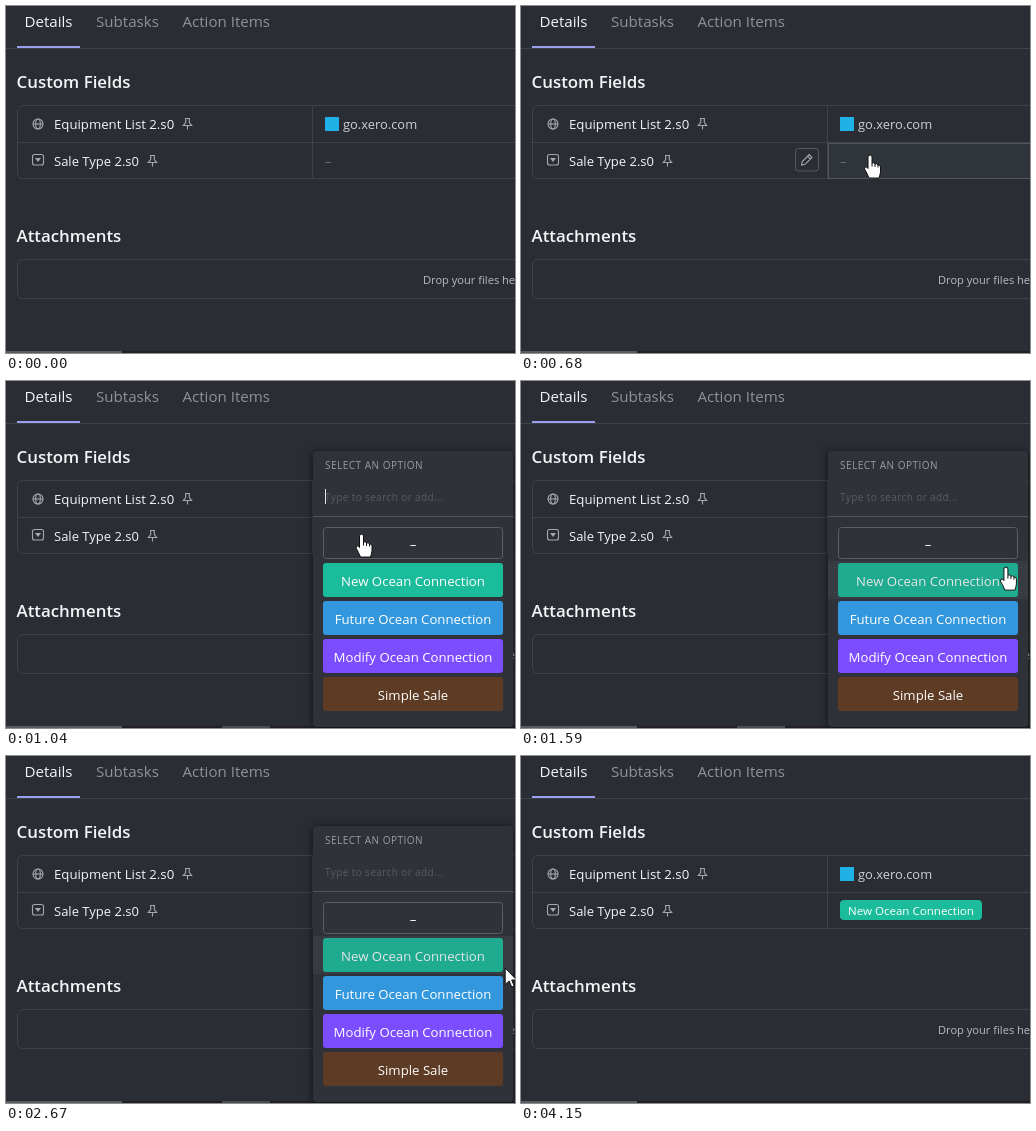
Write an HTML page that moves like this. It is 509 px wide and 347 px high and loops after 4.22 s.

```html
<!DOCTYPE html>
<html lang="en">
<head>
<meta charset="utf-8">
<title>Custom fields</title>
<style>
  html, body { margin: 0; width: 100%; height: 100%; overflow: hidden; background: #2a2d34; }
  svg { display: block; font: 13.2px "Open Sans", "Noto Sans", sans-serif; }
  .line { fill: none; stroke: #3e4249; }
  .icon { fill: none; stroke: #a4a8b0; stroke-width: 1.1; }
  .dim { fill: #8e939c; }
  .tab { font-size: 15.1px; }
  .head { font-size: 16.9px; font-weight: 600; }
  .mid { text-anchor: middle; }
  #panel { filter: drop-shadow(0 1px 4px #0009); }
  #cursor path { fill: #fff; stroke: #111; stroke-linejoin: round; }
</style>
</head>
<body>
<svg width="509" height="347" viewBox="0 0 509 347" fill="#f4f5f7">
  <defs>
    <path id="pin" class="icon" d="M2.5 .5H7.5M3.2 .5V4.5L.8 7.5H9.2L6.8 4.5V.5M5 7.5V11.5"/>
  </defs>

  <path class="line" d="M0 42.5H509"/>
  <path fill="#9b9ff0" d="M11 40H74V42H11Z"/>
  <g class="tab">
    <text x="18.5" y="21">Details</text>
    <text x="90" y="21" class="dim">Subtasks</text>
    <text x="176.5" y="21" class="dim">Action Items</text>
  </g>

  <text x="10.5" y="82" class="head">Custom Fields</text>
  <path class="line" d="M509 99.5H17.5Q11.5 99.5 11.5 105.5V166.5Q11.5 172.5 17.5 172.5H509M11.5 136.5H509M306.5 99.5V172.5"/>
  <g class="icon">
    <circle cx="32" cy="118" r="5"/>
    <ellipse cx="32" cy="118" rx="2.3" ry="5"/>
    <path d="M27 118H37"/>
    <rect x="26.5" y="148.5" width="11" height="10.5" rx="2"/>
  </g>
  <path fill="#a4a8b0" d="M29 152H35L32 156Z"/>
  <text x="48" y="123">Equipment List 2.s0</text>
  <text x="48" y="160" font-size="13">Sale Type 2.s0</text>
  <use href="#pin" x="176.5" y="112"/>
  <use href="#pin" x="141.5" y="149"/>
  <rect x="319" y="111" width="14" height="14" fill="#1fb1e6"/>
  <text x="337" y="123" font-size="12.9" fill="#cdd1d6">go.xero.com</text>

  <g id="hover">
    <rect x="307.5" y="137.5" width="210" height="35" fill="#30353b" stroke="#50555c"/>
    <rect x="274.5" y="142.5" width="23" height="22.5" rx="3" fill="none" stroke="#555960"/>
    <path class="icon" d="M280.5 159L281.3 155.5L288.2 148.6L291 151.4L284 158.3ZM286.6 150.2L289.4 153"/>
  </g>
  <text id="none" x="319" y="160" fill="#6b7078">–</text>
  <g id="badge">
    <rect x="319" y="144" width="142" height="20" rx="4" fill="#1bbc9c"/>
    <text x="390" y="158.5" class="mid" font-size="11.55" fill="#fff">New Ocean Connection</text>
  </g>

  <text x="10.5" y="236" class="head">Attachments</text>
  <path class="line" d="M509 253.5H17.5Q11.5 253.5 11.5 259.5V286.5Q11.5 292.5 17.5 292.5H509"/>
  <text x="417" y="278" font-size="11.1" fill="#b8bcc2">Drop your files here</text>

  <path fill="#211f24" d="M0 345H509V347H0Z"/>
  <path fill="#585b60" d="M0 345H116V347H0Z"/>
  <path id="strip" fill="#4b4b50" d="M216 345H264V347H216Z"/>

  <g id="panel">
    <rect x="307" y="70" width="200" height="276" rx="4" fill="#2f3339"/>
    <text x="319" y="88" font-size="10" letter-spacing=".5" fill="#989ca4">SELECT AN OPTION</text>
    <text x="319" y="120" font-size="10" letter-spacing=".4" fill="#575b62">Type to search or add...</text>
    <path id="caret" stroke="#e4e6e8" d="M319.5 108V123"/>
    <path stroke="#50545a" d="M307 135.5H507"/>
    <rect id="band" x="307" y="180" width="200" height="38" fill="#383c42"/>
    <rect x="317.5" y="146.5" width="179" height="31" rx="3" fill="none" stroke="#5a5e65"/>
    <text x="407" y="168" class="mid">–</text>
    <g id="options"></g>
  </g>

  <g id="cursor">
    <path id="arrow" d="M0 0V16.5L4 13L6.5 19L9 18L6.5 12H11.5Z"/>
    <g id="hand">
      <path d="M-2 2Q-2 0 0 0T2 2V8Q4 7 5 9Q7 8 8 10Q10.5 9.5 10.5 12V17Q10 20 9 23H-1Q-3 18 -5.5 14Q-5.5 11 -3 12L-2 13.5Z"/>
      <path style="fill:none" d="M2 8V11.5M5 9V12M8 10V12.5"/>
    </g>
  </g>
</svg>
<script>
const LOOP = 4220, OPEN = 890, CLOSE = 2740;
const $ = id => document.getElementById(id);
const show = (id, on) => $(id).style.display = on ? "" : "none";

$("options").innerHTML = [
  ["New Ocean Connection", "#1bbc9c"],
  ["Future Ocean Connection", "#3397dd"],
  ["Modify Ocean Connection", "#7c4dff"],
  ["Simple Sale", "#5d3b24"]
].map(([label, color], i) => `<g>
  <rect x="317" y="${182 + i * 38}" width="180" height="34" rx="3" fill="${color}"/>
  <text x="407" y="${204.5 + i * 38}" class="mid" fill="#fff">${label}</text></g>`).join("");
const first = $("options").firstElementChild;

// Pointer path: time, x, y of the tip. It rises from below, slowing down.
const path = [
  [260, 259, 292], [400, 312, 207], [540, 340, 164], [680, 349, 149],
  [890, 355, 153], [1040, 355, 153], [1320, 497, 168], [1450, 497, 168],
  [1800, 467, 213], [2400, 467, 213], [2670, 499, 212], [2740, 512, 212]
];

function pointer(t) {
  const i = path.findIndex(p => p[0] > t);
  if (i < 1) return null;
  const [a, b] = [path[i - 1], path[i]];
  const k = (t - a[0]) / (b[0] - a[0]);
  return { x: a[1] + (b[1] - a[1]) * k, y: a[2] + (b[2] - a[2]) * k };
}

function draw(t) {
  const p = pointer(t);
  const open = t >= OPEN && t < CLOSE;
  const done = t >= CLOSE;

  show("cursor", p);
  if (p) {
    const hand = open ? p.x < 497 : p.x > 307 && p.y < 172;
    $("cursor").setAttribute("transform", `translate(${p.x} ${p.y})`);
    show("hand", hand);
    show("arrow", !hand);
  }

  show("hover", p && !open && p.y < 172);
  show("none", !done);
  show("badge", done);
  show("strip", t >= 1040 && t < 4150);

  show("panel", open);
  $("panel").style.opacity = Math.min(1, 0.3 + (t - OPEN) / 200);
  show("caret", t >= 1020 && t < 1550 || t >= 2130 && t < 2640);
  const over = p && p.y > 180;
  show("band", over);
  first.style.opacity = over ? 0.87 : 1;
}

const start = performance.now();
function tick() {
  draw((performance.now() - start) % LOOP);
  requestAnimationFrame(tick);
}
tick();
</script>
</body>
</html>
```
